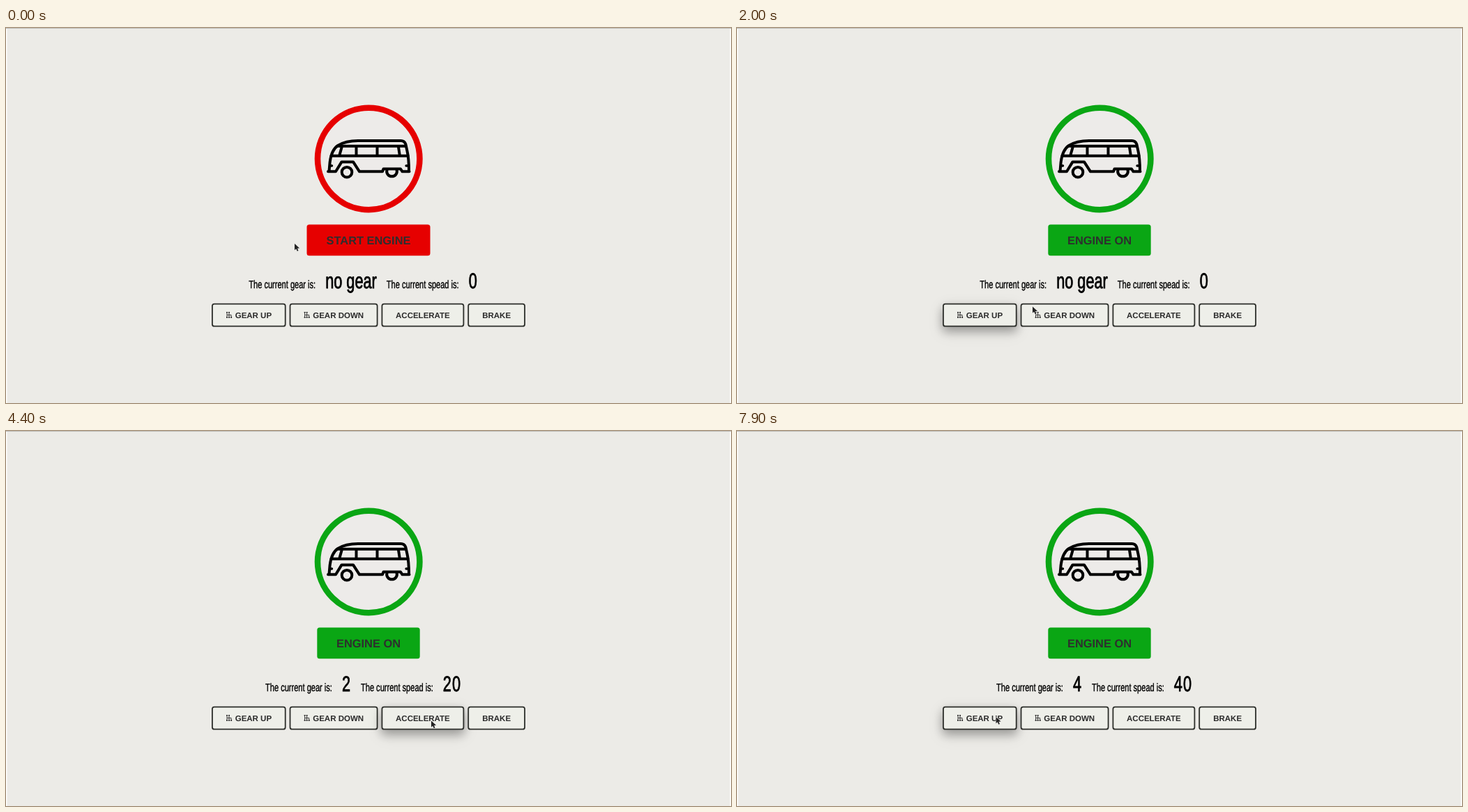
Animation, 1040 px wide and 539 px high, one loop 8000 ms. Source, as an HTML page:

```html
<!DOCTYPE html>
<html lang="en">
<head>
<meta charset="utf-8">
<title>Van controls</title>
<style>
html, body { margin: 0; width: 100%; height: 100%; overflow: hidden; background: #fff; }
svg { display: block; position: absolute; left: 0; top: 0; }
text {
  font-family: "Liberation Sans", Arial, sans-serif;
  text-anchor: middle; text-rendering: geometricPrecision;
}
.btn text { font-weight: bold; font-size: 11.5px; fill: #2b2b2b; }
.btn rect { fill: #eeefe9; stroke: #2c2e2a; stroke-width: 1.8px; }
#start text { font-size: 16.4px; fill: #2e2e2e; }
#start rect { fill: var(--engine); stroke: none; }
#ring { stroke: var(--engine); }
.hover rect {
  filter: drop-shadow(0 7px 7px rgba(0,0,0,.24)) drop-shadow(0 5px 9px rgba(0,0,0,.16));
}
#info { font-size: 15.8px; stroke: #000; stroke-width: .4px; }
#info .big { font-size: 31px; stroke-width: .9px; }
#info .digit { letter-spacing: 1.4px; }
</style>
</head>
<body>
<svg id="stage" width="1040" height="539" viewBox="0 0 1040 539">
  <rect x="1.5" width="1037" height="539" fill="#ecebe7"/>
  <rect width="1040" height="1" fill="#bfbebb"/>

  <circle id="ring" cx="520.2" cy="188" r="73.2" fill="#edebe9" stroke-width="8.6"/>
  <g fill="none" stroke="#000" stroke-width="4" stroke-linecap="round" stroke-linejoin="round">
    <path d="M462 206.3H473L481.5 192.4H498L507 206.3H540L541.5 202.5H566L568.5 206.3H578.5"/>
    <path d="M463.5 206L464.6 193C466 182 470 173 476 169C484 164 494 162 505 162H566.5Q571.5 162 573.3 167L575.5 177Q578 188 578 206"/>
    <path d="M477 169.7H573.5M466.5 183.7H576.5M482 170L478.3 183M502.5 170V183M532.5 170V183M562.8 170L564.8 183"/>
    <path d="M465 198H467.5M574 198H577" stroke-width="3.4"/>
    <circle cx="489" cy="207.2" r="7.3"/>
    <path d="M546.5 204A7.3 7.3 0 1 0 560.5 204"/>
  </g>

  <g class="btn" id="start"><rect y="282.5" height="44.8" rx="3.6"/><text x="520" y="311"></text></g>

  <!-- one condensed style for the whole line -->
  <text id="info" transform="translate(512.5 373.5) scale(.7 1)"><tspan>The current gear is:</tspan><tspan
    id="gear" dx="20"></tspan><tspan dx="20">The current spead is:</tspan><tspan
    id="speed" dx="20" class="big digit"></tspan></text>

  <g id="row"></g>

  <path id="cursor" d="M0 0V9.2L2.1 7.3L3.8 10.8L5.4 10.1L3.9 6.7L7 6.5Z"
    fill="#222" stroke="#e4e4e2" stroke-width="1.2" stroke-linejoin="round" paint-order="stroke"/>
</svg>

<script>
const LOOP = 8000, STEP = 100, LEAD = 2;
const $ = id => document.getElementById(id);

// Straight pointer moves: first step, last step, end point.
const HOME = [414, 310];
const moves = [
  [600, 800, 495, 314],
  [1600, 1800, 437, 397],
  [2000, 2400, 372, 414],
  [3000, 3000, 370.5, 415],
  [3800, 4200, 610, 416.5],
  [5400, 6000, 675, 416.5],
  [6400, 6800, 391, 414.5],
  [7000, 7200, 371.5, 411]
];
const clicks = [1200, 2800, 3400, 4400, 4900, 5100, 6000, 7400, 7900];

const actions = {
  start: s => s.on = true,
  up: s => s.gear++,
  accel: s => s.speed += 20,
  brake: s => s.speed -= 20
};

const ROW = { x: 295, y: 395.7, height: 33.9, gap: 5 };
const row = [
  { id: "up", label: "GEAR UP", width: 106.6, icon: true },
  { id: "down", label: "GEAR DOWN", width: 126.9, icon: true },
  { id: "accel", label: "ACCELERATE", width: 118.8 },
  { id: "brake", label: "BRAKE", width: 82.7 }
];

function buildRow() {
  let x = ROW.x;
  for (const b of row) {
    b.x = x;
    const shift = b.icon ? 6.6 : 0;
    const icon = b.icon ? `<g transform="translate(${x + 20.5} 407.5)" fill="none" stroke="#2b2b2b">
      <path d="M1.5 .7V9M4.5 .7V9M7.6 5V9M1.5 5H7.6" stroke-width=".9"/>
      <path d="M.5 1.2H2.5M3.5 1.2H5.5M.5 8.4H2.5M3.5 8.4H5.5M6.6 8.4H8.6" stroke-width="1.6"/></g>` : "";
    $("row").innerHTML += `<g class="btn" id="${b.id}">
      <rect x="${x + .9}" y="${ROW.y + .9}" width="${b.width - 1.8}" height="${ROW.height - 1.8}" rx="3"/>
      ${icon}<text x="${x + b.width / 2 + shift}" y="416.6">${b.label}</text></g>`;
    x += b.width + ROW.gap;
  }
}

// Pointer at time t; "ahead" looks that many steps further along the same move.
function pointer(t, ahead = 0) {
  let [x, y] = HOME;
  for (const [from, to, toX, toY] of moves) {
    if (t < from) break;
    const p = Math.min(1, ((t - from) / STEP + 1 + ahead) / ((to - from) / STEP + 1));
    x += (toX - x) * p;
    y += (toY - y) * p;
  }
  return [x, y];
}

// The page reacts slightly before the drawn cursor arrives.
function hovered(t) {
  const [x, y] = pointer(t, LEAD);
  if (y > 282 && y < 328 && x > 431 && x < 609) return "start";
  if (y < ROW.y || y > ROW.y + ROW.height) return "";
  const hit = row.find(b => x >= b.x && x <= b.x + b.width);
  return hit ? hit.id : "";
}

function stateAt(t) {
  const s = { on: false, gear: 0, speed: 0 };
  for (const c of clicks) if (c <= t) actions[hovered(c)]?.(s);
  return s;
}

function draw(t) {
  const { on, gear, speed } = stateAt(t);
  const width = on ? 147.4 : 177;
  $("stage").style.setProperty("--engine", on ? "#0aa614" : "#e60000");
  const [box, label] = $("start").children;
  box.setAttribute("x", 520 - width / 2);
  box.setAttribute("width", width);
  label.textContent = on ? "ENGINE ON" : "START ENGINE";

  $("gear").textContent = gear || "no gear";
  $("gear").setAttribute("class", gear ? "big digit" : "big");
  $("speed").textContent = speed;

  const hot = hovered(t);
  document.querySelectorAll(".btn").forEach(b => b.classList.toggle("hover", b.id === hot));
  $("cursor").setAttribute("transform", `translate(${pointer(t)})`);
}

buildRow();
const origin = performance.now();
let last = -1;
function tick() {
  const t = Math.floor((performance.now() - origin) % LOOP / STEP) * STEP;
  if (t !== last) draw(last = t);
  requestAnimationFrame(tick);
}
tick();
</script>
</body>
</html>
```
